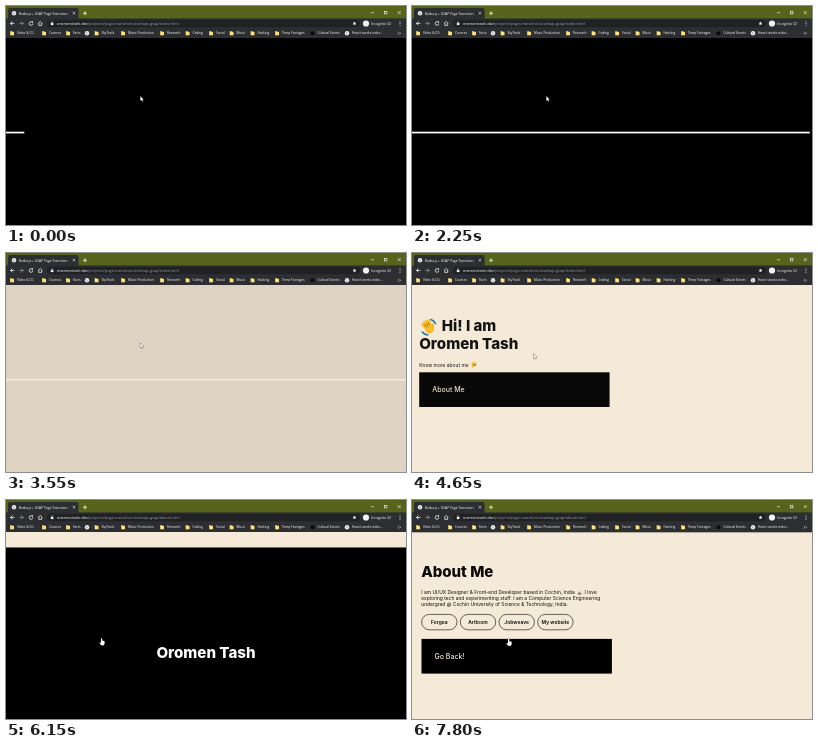
Write an HTML page with a canvas that moves like this. It is 400 by 219 pixels and loops after 8 s.

```html
<!DOCTYPE html>
<html lang="en">
<head>
<meta charset="utf-8">
<title>Page transition</title>
<style>
  html, body { margin: 0; width: 100%; height: 100%; overflow: hidden; background: #000; }
  canvas { display: block; width: 100%; height: 100%; }
</style>
</head>
<body>
<canvas id="stage" width="400" height="219"></canvas>
<script>
const ctx = document.getElementById('stage').getContext('2d');
const W = 400, H = 219, TOP = 32, PAGE = H - TOP;
const LOOP = 8000, STEP = 50;
const CREAM = '#f5e9d7', INK = '#0a0a0a', BAR = '#2d2e32', YELLOW = '#fbbc22';
const UI = '"Open Sans", sans-serif', BODY = 'Inter, sans-serif';
const NAME = 'Oromen Tash';

// Timing helpers
const progress = (t, start, duration) => Math.min(1, Math.max(0, (t - start) / duration));
const quartInOut = u => u < .5 ? 8 * u ** 4 : 1 - 8 * (1 - u) ** 4;
const expoInOut = u => u <= 0 ? 0 : u >= 1 ? 1
  : u < .5 ? 2 ** (20 * u - 11) : 1 - 2 ** (9 - 20 * u);

// Drawing helpers
function rect(x, y, w, h, color) {
  ctx.fillStyle = color;
  ctx.fillRect(x, y, w, h);
}
function rounded(x, y, w, h, r) {
  ctx.beginPath();
  ctx.roundRect(x, y, w, h, r);
}
function circle(x, y, r, color) {
  ctx.fillStyle = color;
  ctx.beginPath();
  ctx.arc(x, y, r, 0, 7);
  ctx.fill();
}
function line(points, color, width = .75) {
  ctx.strokeStyle = color;
  ctx.lineWidth = width;
  ctx.beginPath();
  points.forEach(([x, y]) => ctx.lineTo(x, y));
  ctx.stroke();
}
function at(x, y, draw, angle = 0) {
  ctx.save();
  ctx.translate(x, y);
  ctx.rotate(angle);
  draw();
  ctx.restore();
}
// Laid out large and scaled down so that small sizes keep exact advances.
function text(str, x, y, size, color, weight = 400, family = BODY, align = 'left') {
  let width;
  at(x, y, () => {
    ctx.scale(size / 100, size / 100);
    ctx.font = `${weight} 100px ${family}`;
    ctx.textAlign = align;
    ctx.fillStyle = color;
    ctx.fillText(str, 0, 0);
    width = ctx.measureText(str).width * size / 100;
  });
  return width;
}

// Browser frame
function globe(x, y) {
  circle(x, y, 2.2, '#f1f3f4');
  line([[x - 1.2, y - .8], [x + .2, y], [x - .2, y + 1.3]], '#70757a', .7);
}
function folder(x, y) {
  rect(x - 1.8, y - 2, 1.9, 1, '#f8d75c');
  rect(x - 1.8, y - 1.4, 3.8, 3.5, '#ffe27a');
}
const bookmarks = [
  [6, 'Video & CG'], [38, 'Courses'], [62, 'Facts'], [81, '', globe], [90.5, 'SkyTrails'],
  [117, 'Music Production'], [156, 'Research'], [181.5, 'Coding'], [205, 'Social'],
  [225.5, 'Music'], [246.5, 'Hacking'], [271, 'Temp Footages'],
  [306.5, 'Cultural Events', (x, y) => circle(x, y, 2, '#080808')],
  [341, 'How it works video...', globe],
];
function browser(page) {
  const icon = '#f1f3f4', dim = '#8b8f94';
  rect(0, 0, W, 13, '#58631b');
  rect(0, 12.4, W, TOP - 12.4, BAR);
  ctx.fillStyle = BAR;
  rounded(2, 2, 70.5, 12, [2, 2, 0, 0]);
  ctx.fill();
  globe(8, 7.3);
  text('Barba.js + GSAP Page Transition', 12.8, 8.5, 3.3, '#fff', 500, UI);
  line([[66.7, 6], [69.1, 8.4]], icon, .6);
  line([[69.1, 6], [66.7, 8.4]], icon, .6);
  line([[77, 7.3], [81, 7.3]], '#fff');
  line([[79, 5.3], [79, 9.3]], '#fff');
  line([[365, 6.7], [368, 6.7]], '#fff', .6);
  ctx.strokeRect(378.3, 5.3, 2.6, 2.6);
  line([[391.8, 5.1], [394.8, 8.1]], '#fff', .6);
  line([[394.8, 5.1], [391.8, 8.1]], '#fff', .6);

  line([[8.5, 17.5], [4.5, 17.5], [6.3, 15.7], [4.5, 17.5], [6.3, 19.3]], icon);
  line([[13.2, 17.5], [17.2, 17.5], [15.4, 15.7], [17.2, 17.5], [15.4, 19.3]], dim);
  ctx.strokeStyle = icon;
  ctx.beginPath();
  ctx.arc(25, 17.5, 1.8, 0, 5.2);
  ctx.stroke();
  rect(25.7, 15.3, 1.3, 1.4, icon);
  line([[32, 17.6], [34.2, 15.5], [36.4, 17.6]], icon);
  line([[32.8, 17.2], [32.8, 19.4], [35.6, 19.4], [35.6, 17.2]], icon);
  ctx.fillStyle = '#202124';
  rounded(41, 13.8, 313, 7.4, 3.7);
  ctx.fill();
  rect(44.8, 17, 2.6, 2.1, icon);
  line([[45.3, 17], [45.3, 15.8], [46.9, 15.8], [46.9, 17]], icon, .4);
  const host = text('oromentash.dev', 51, 18.9, 4.05, '#fff', 500, UI);
  text(`/projects/page-transitions-barbajs-gsap/${page}.html`, 51 + host, 18.9, 3.85, '#9aa0a6', 400, UI);
  at(348.5, 17.5, () => {
    ctx.fillStyle = icon;
    ctx.beginPath();
    for (let i = 0; i < 10; i++) {
      const r = i % 2 ? .9 : 2.1, a = i * Math.PI / 5;
      ctx.lineTo(r * Math.sin(a), -r * Math.cos(a));
    }
    ctx.fill();
  });
  circle(360, 17.5, 3.1, '#f1f3f4');
  text('Incognito (2)', 365.3, 18.7, 3.4, '#fff', 500, UI);
  [15.8, 17.5, 19.2].forEach(y => circle(394, y, .5, icon));

  bookmarks.forEach(([x, label, draw = folder]) => {
    draw(x, 27.2);
    text(label, x + 4.9, 28.4, 3.2, '#fff', 500, UI);
  });
  line([[391.8, 26.2], [393, 27.3], [391.8, 28.4]], icon, .5);
  line([[393.5, 26.2], [394.7, 27.3], [393.5, 28.4]], icon, .5);
}

// Small pictograms
function wavingHand(x, y) {
  at(x, y, () => {
    ctx.lineCap = 'round';
    [-3, -1, 1, 3].forEach((dx, i) =>
      line([[dx, 1], [dx * 1.2, -5.6 - (i % 3 ? .8 : 0)]], YELLOW, 2.3));
    line([[2.5, 4], [5.6, 0]], YELLOW, 2.3);
    ctx.fillStyle = YELLOW;
    rounded(-4.2, -2, 8.2, 8.6, 3.5);
    ctx.fill();
    [-2, 0, 2].forEach(dx => line([[dx, -1], [dx * 1.15, -4.5]], '#9a6410', .7));
    ctx.strokeStyle = '#1f6f9f';
    ctx.lineWidth = 1.6;
    [[-.7, .1], [2.2, 3]].forEach(([from, to]) => {
      ctx.beginPath();
      ctx.arc(0, 0, 8, from, to);
      ctx.stroke();
    });
  }, -.55);
}
function pointingDown(x, y) {
  ctx.fillStyle = YELLOW;
  rounded(x - 2.3, y - 2.8, 4.9, 3.8, 1.3);
  ctx.fill();
  line([[x - 1.1, y], [x - 1.1, y + 2.9]], YELLOW, 1.4);
  line([[x - .1, y + 1], [x + .2, y - .8], [x + 2.2, y + .6]], '#6b470c', .7);
}

// Pages
function button(x, y, label) {
  rect(x, y, 190.4, 34.7, '#000');
  text(label, x + 13, y + 19.7, 7, CREAM, 500);
}
function home(t) {
  const p = quartInOut(progress(t, 3985, 900));
  at(9.5 - 62 * (1 - p), 0, () => {
    ctx.globalAlpha = p;
    wavingHand(9.2, 74);
    text('Hi! I am', 22.6, 78.4, 15, INK, 800);
    text(NAME, 0, 95.6, 15.1, INK, 800);
    text('Know more about me', 0, 113.5, 4.9, INK);
    pointingDown(54.6, 112);
    button(0, 119.3, 'About Me');
  });
}
function about() {
  text('About Me', 9.2, 77.2, 15, INK, 800);
  text('I am UI/UX Designer & Front-end Developer based in Cochin, India', 9.3, 94.4, 4.9, INK);
  circle(167.4, 92.5, 1, '#c08a50');
  rect(165.8, 93, 3.4, 1.7, '#77818a');
  text('. I love', 169.8, 94.4, 4.9, INK);
  text('exploring tech and experimenting stuff. I am a Computer Science Engineering', 9.3, 100.2, 4.9, INK);
  text('undergrad @ Cochin University of Science & Technology, India.', 9.3, 106, 4.9, INK);
  ['Forgea', 'Artloom', 'Jobweave', 'My website'].forEach((label, i) => {
    const x = 9.6 + i * 38.7;
    ctx.strokeStyle = INK;
    ctx.lineWidth = .6;
    rounded(x, 114.4, 35.4, 15.4, 7.7);
    ctx.stroke();
    text(label, x + 17.7, 123.8, 5, INK, 600, BODY, 'center');
  });
  button(9.5, 138.9, 'Go Back!');
}

// Overlays
function loader(t) {
  rect(0, TOP, W, PAGE, '#000');
  rect(0, 125.7, W * quartInOut(progress(t, -1100, 4000)), 1.7, '#fff');
  // Fading the whole layer out equals fading the empty page in above it.
  ctx.globalAlpha = quartInOut(progress(t, 2947, 900));
  rect(0, TOP, W, PAGE, CREAM);
  ctx.globalAlpha = 1;
}
function curtain(t) {
  const enter = expoInOut(progress(t, 5728, 670));
  const leave = expoInOut(progress(t, 7228, 620));
  at(0, PAGE * (1 - enter - leave), () => {
    rect(0, TOP, W, PAGE, '#000');
    text(NAME, 200, 143, 15.1, '#fff', 800, BODY, 'center');
  });
}

// Pointer
const pointerPath = [
  [4300, 134.4, 90.2], [4650, 121.5, 100.8], [5050, 104.5, 120],
  [5250, 95.6, 138.2], [6700, 95.6, 138.2], [6850, 96.6, 138.8],
];
function pointerAt(t) {
  const next = pointerPath.findIndex(k => k[0] > t);
  if (next === 0) return pointerPath[0].slice(1);
  if (next < 0) return pointerPath.at(-1).slice(1);
  const [t0, x0, y0] = pointerPath[next - 1], [t1, x1, y1] = pointerPath[next];
  const u = (t - t0) / (t1 - t0);
  return [x0 + (x1 - x0) * u, y0 + (y1 - y0) * u];
}
const arrow = new Path2D('M0 0V4.6L1 3.7L1.8 5.3L2.5 5L1.8 3.4H3.2Z');
const hand = new Path2D('M-.6 .5Q0-.4 .6 .5V2.4L3 3Q3.3 5.4 2.4 7H-.5L-2.1 4.6Q-1.9 3.7-.6 4.6Z');
function pointer(t) {
  const [x, y] = pointerAt(t);
  const shape = y > 119 ? hand : arrow;
  at(x, y, () => {
    ctx.strokeStyle = '#222';
    ctx.lineWidth = .6;
    ctx.stroke(shape);
    ctx.fillStyle = '#fff';
    ctx.fill(shape);
  });
}

function render(t) {
  const secondPage = t >= 6900;
  rect(0, 0, W, H, CREAM);
  if (secondPage) about(); else home(t);
  if (t < 3850) loader(t);
  if (t >= 5750) curtain(t);
  browser(t < 5850 ? 'index' : 'about');
  pointer(t);
}

const start = performance.now();
function tick() {
  const t = (performance.now() - start) % LOOP;
  render(Math.floor(t / STEP) * STEP);
  requestAnimationFrame(tick);
}
tick();
</script>
</body>
</html>
```
